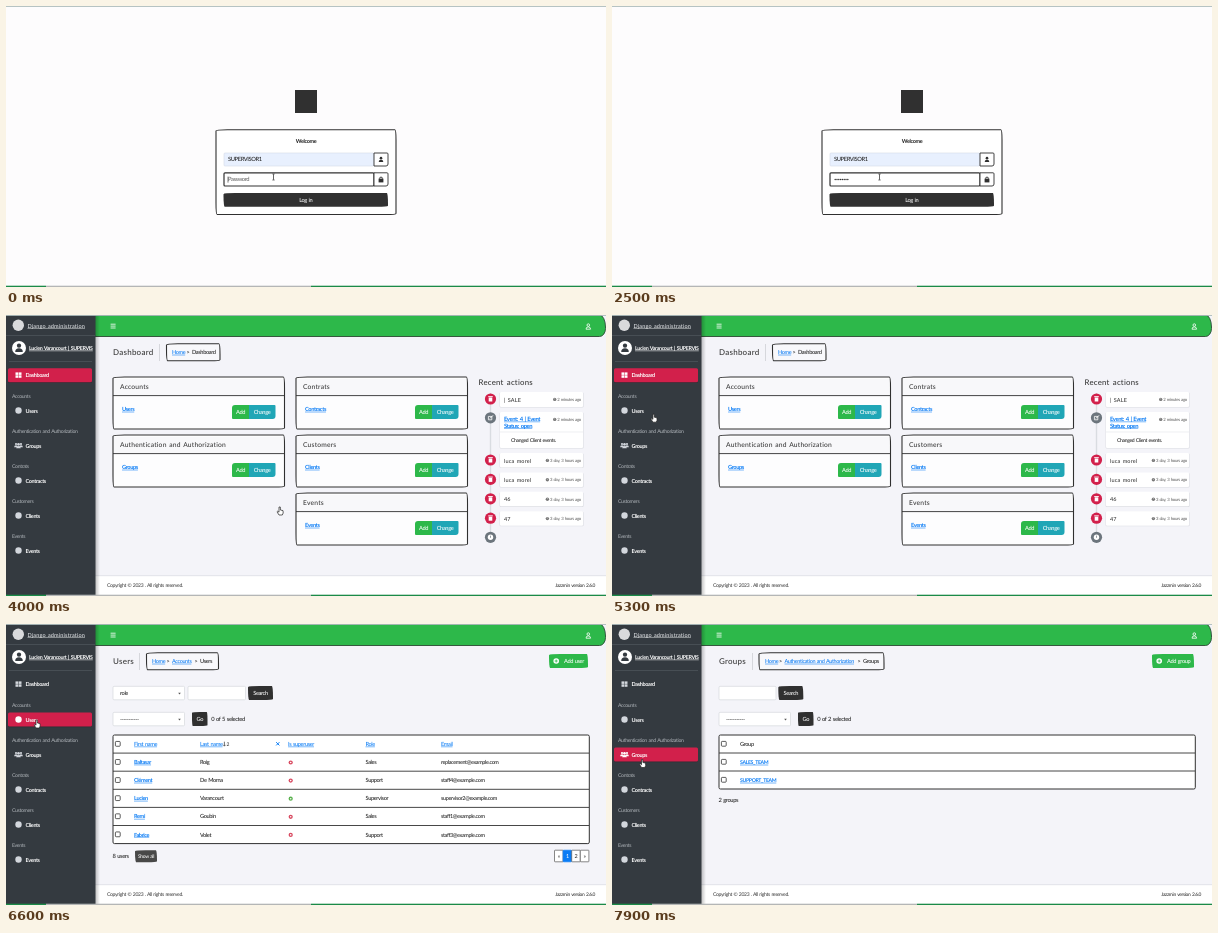
An HTML page with a canvas that plays this animation: 600x281 px, repeating every 8000 ms.

```html
<!DOCTYPE html>
<html lang="en">
<head>
<meta charset="utf-8">
<title>Admin walkthrough</title>
<style>
html, body { margin: 0; width: 100%; height: 100%; overflow: hidden; background: #fdfcfd; }
canvas { display: block; width: 600px; height: 281px; }
</style>
</head>
<body>
<canvas id="stage"></canvas>
<script>
const W = 600, H = 281, LOOP = 8000, STEP = 100;
const INK = '#303030', BLUE = '#0a7cf5', GREEN = '#2db84a', RED = '#d2204b', TEAL = '#20a6b6', PAGE = '#f4f4f9';
const canvas = document.getElementById('stage');
const ctx = canvas.getContext('2d');
const dpr = window.devicePixelRatio || 1;
canvas.width = W * dpr;
canvas.height = H * dpr;

// ---- helpers ----
function box(x, y, w, h, fill) {
  ctx.fillStyle = fill;
  ctx.fillRect(x, y, w, h);
}

function line(x1, y1, x2, y2, color, width = 1) {
  ctx.strokeStyle = color;
  ctx.lineWidth = width;
  ctx.beginPath();
  ctx.moveTo(x1, y1);
  ctx.lineTo(x2, y2);
  ctx.stroke();
}

function disc(x, y, r, fill) {
  ctx.fillStyle = fill;
  ctx.beginPath();
  ctx.arc(x, y, r, 0, 7);
  ctx.fill();
}

function round(x, y, w, h, r, fill, stroke, width = 0.7) {
  ctx.beginPath();
  ctx.roundRect(x, y, w, h, r);
  if (fill) { ctx.fillStyle = fill; ctx.fill(); }
  if (stroke) { ctx.strokeStyle = stroke; ctx.lineWidth = width; ctx.stroke(); }
}

// Hand-drawn looking box: uneven elliptical corners
function sketch(x, y, w, h, fill, stroke, width = 1) {
  const k = Math.min(0.045, h / 285, w / 500);
  const r = [{ x: 255 * k, y: 25 * k }, { x: 25 * k, y: 225 * k }, { x: 225 * k, y: 25 * k }, { x: 25 * k, y: 255 * k }];
  round(x, y, w, h, r, fill, stroke, width);
}

function text(s, x, y, size, color = '#222', o = {}) {
  const sp = o.sp ?? -0.07;
  ctx.font = `${o.bold ? 700 : 500} ${size}px Lato, "Open Sans", sans-serif`;
  ctx.textRendering = 'geometricPrecision';
  ctx.letterSpacing = sp * size + 'px';
  ctx.wordSpacing = 0.12 * size + 'px';
  ctx.fillStyle = color;
  ctx.textAlign = 'left';
  const w = ctx.measureText(s).width;
  if (o.align === 'center') x -= w / 2;
  if (o.align === 'right') x -= w;
  ctx.fillText(s, x, y);
  if (o.under) line(x, y + 0.8, x + w, y + 0.8, color, 0.55);
}

const head = (s, x, y, size, color = '#3a3a3a', o = {}) => text(s, x, y, size, color, { sp: 0.03, ...o });
const link = (s, x, y, size = 5.7, bold = false) => text(s, x, y, size, BLUE, { under: true, bold });

function button(s, x, y, w, h, fill) {
  sketch(x, y, w, h, fill);
  text(s, x + w / 2, y + h / 2 + 2, 5.7, '#fff', { align: 'center' });
}

function person(x, y, k, color) {
  disc(x, y - 1.3 * k, 1.2 * k, color);
  ctx.beginPath();
  ctx.arc(x, y + 2.2 * k, 2.1 * k, Math.PI, 0);
  ctx.fill();
}

function caretDown(x, y) {
  ctx.fillStyle = '#555';
  ctx.beginPath();
  ctx.moveTo(x - 1.3, y - 0.7);
  ctx.lineTo(x + 1.3, y - 0.7);
  ctx.lineTo(x, y + 1);
  ctx.fill();
}

// ---- login ----
function login(t) {
  box(0, 0, W, H, '#fdfcfd');
  box(289, 84, 22, 23, INK);
  sketch(210, 123.7, 180, 84.8, '#fff', INK, 1.1);
  text('Welcome', 300, 137, 5.5, '#222', { align: 'center', bold: true });

  round(218, 147, 150, 13, 1, '#e8f0fe', '#d5dbe6', 0.6);
  text('SUPERVISOR1', 222, 155.4, 5.8);
  round(368, 147, 14, 13, [0, 1, 2, 0], '#fff', INK, 0.9);
  person(375, 153.6, 1.1, INK);

  const focus = t < 3200;
  round(218, 166.8, 150, 13.2, 1, '#fff', '#333', focus ? 1.2 : 0.9);
  round(368, 166.8, 14, 13.2, [0, 1, 2, 0], '#fff', INK, 0.9);
  box(372.6, 172.6, 4.8, 3.8, INK);
  ctx.strokeStyle = INK;
  ctx.lineWidth = 0.9;
  ctx.beginPath();
  ctx.arc(375, 172.6, 1.5, Math.PI, 0);
  ctx.stroke();

  const keys = [800, 1000, 1200, 1400, 1900, 2100, 2300, 2500];
  const typed = keys.filter(k => t >= k).length;
  if (!typed) text('Password', 222, 175.4, 5.8, '#666');
  for (let i = 0; i < typed; i++) disc(223.2 + i * 1.8, 173.6, 0.75, '#333');
  const typing = t >= 800 && t < 2500;
  if (focus && (typing || t % 1000 < 500)) line(222 + typed * 1.85, 170.6, 222 + typed * 1.85, 176.6, '#222', 0.6);

  const hover = t >= 3100;
  button('Log in', 217.5, 187, 164.5, 13.8, hover ? '#1b1b1b' : '#313131');
}

// ---- admin frame ----
function menuItem(s, y, active) {
  if (active) {
    round(2, y - 6.3, 84, 14, 1.5, 'rgba(0,0,0,.22)');
    round(2, y - 7, 84, 14, 1.5, RED);
  }
  const c = active ? '#fff' : '#d3d7dd';
  if (s === 'Dashboard') {
    for (let i = 0; i < 4; i++) box(9.5 + (i % 2) * 3.2, y - 2.8 + (i >> 1) * 2.9, 2.8, 2.5, c);
  } else if (s === 'Groups') {
    person(10, y - 0.3, 0.9, c);
    person(15, y - 0.3, 0.9, c);
    person(12.5, y + 0.3, 1.1, c);
  } else {
    disc(12.5, y, 3.2, c);
  }
  text(s, 19.6, y + 2, 5.5, '#fff', { bold: true });
}

function sidebar(active) {
  const g = ctx.createLinearGradient(89, 0, 94, 0);
  g.addColorStop(0, 'rgba(0,0,0,.25)');
  g.addColorStop(1, 'rgba(0,0,0,0)');
  box(89, 0, 5, H, g);
  box(0, 0, 89.5, H, '#343a40');
  disc(12.3, 10.2, 5.7, '#d9dadc');
  head('Django administration', 21.5, 12.6, 5.5, '#dfe1e4', { under: true });
  line(0, 20.5, 89, 20.5, '#4c535a', 0.8);
  disc(13, 33, 7, '#fff');
  person(13, 33, 1.8, '#343a40');
  ctx.save();
  ctx.beginPath();
  ctx.rect(0, 24, 86.8, 20);
  ctx.clip();
  text('Lucien Varancourt | SUPERVISOR1', 23, 35, 5.4, '#fff', { under: true, bold: true });
  ctx.restore();
  line(3, 46.5, 86, 46.5, '#4c535a', 0.8);

  menuItem('Dashboard', 60.2, active === 'Dashboard');
  const groups = [['Accounts', 'Users'], ['Authentication and Authorization', 'Groups'],
    ['Contrats', 'Contracts'], ['Customers', 'Clients'], ['Events', 'Events']];
  groups.forEach(([title, item], i) => {
    text(title, 6, 83 + i * 35, 5.2, '#a6abb0');
    menuItem(item, 95.5 + i * 35, active === item);
  });
}

function crumbs(title, barX, x, w, parts) {
  head(title, 107, 40, 8);
  line(barX, 29, barX, 46, '#c9cbd0', 0.7);
  sketch(x, 28.8, w, 17, '#f8f8fb', INK, 1.1);
  parts.forEach(([s, px], i) => {
    const last = i === parts.length - 1;
    if (last) text(s, px, 39.2, 5.7);
    else link(s, px, 39.2, 5.5);
    if (!last) text('>', parts[i + 1][1] - 5.6, 39.2, 5.5);
  });
}

function frame(active, page) {
  box(0, 0, W, H, PAGE);
  round(86, 0, 513.5, 21.5, [0, { x: 6, y: 12 }, { x: 6, y: 8 }, 0], GREEN, '#2c4a34', 0.9);
  for (let i = 0; i < 3; i++) line(104.6, 9.2 + i * 1.9, 109.6, 9.2 + i * 1.9, '#fff', 0.8);
  ctx.strokeStyle = '#fff';
  ctx.lineWidth = 0.8;
  ctx.beginPath();
  ctx.arc(582.3, 10.1, 1.3, 0, 7);
  ctx.moveTo(580, 14.2);
  ctx.arc(582.3, 14.2, 2.3, Math.PI, 0);
  ctx.closePath();
  ctx.stroke();
  page();
  box(89, 261, 511, 20, '#fff');
  line(89, 260.7, W, 260.7, '#dcdfe4', 0.8);
  text('Copyright © 2023 . All rights reserved.', 101, 272.2, 5.1, '#444');
  text('Jazzmin version 2.6.0', 589, 272.2, 4.9, '#333', { align: 'right' });
  sidebar(active);
}

// ---- dashboard ----
function card(x, y, title, item) {
  sketch(x, y, 171.5, 52, '#fdfdfe', INK, 1.1);
  box(x + 1, y + 2, 169, 16, '#f8f8fa');
  line(x, y + 18.6, x + 171, y + 18.6, INK, 0.9);
  head(title, x + 7, y + 11.6, 6.7);
  link(item, x + 9, y + 34.2, 5.7, true);
  round(x + 119, y + 28, 17, 14, [3, 0, 0, 1], GREEN);
  round(x + 136, y + 28, 26.5, 14, [0, 1, 3, 0], TEAL);
  text('Add', x + 127.5, y + 37.1, 5.7, '#fff', { align: 'center' });
  text('Change', x + 149, y + 37.1, 5.7, '#fff', { align: 'center' });
}

function action(y, h, title, ago, kind) {
  round(493.6, y + 0.6, 84, h, 1, '#dcdde2');
  round(494, y, 83, h, 1, '#fff');
  const cy = kind === 'edit' ? y + 5.8 : y + 7;
  disc(484.5, cy, 5.6, kind === 'edit' ? '#6c757d' : RED);
  if (kind === 'edit') {
    ctx.strokeStyle = '#fff';
    ctx.lineWidth = 0.8;
    ctx.strokeRect(482.4, cy - 1.4, 3.4, 3.4);
    line(484, cy + 0.6, 487, cy - 2.4, '#fff', 1);
    link('Event: 4 | Event', 498, y + 9, 5.9, true);
    link('Status: open', 498, y + 15.6, 5.9, true);
    line(494, y + 20, 577, y + 20, '#e3e5e9', 0.6);
    text('Changed Client events.', 505, y + 30.4, 5.1);
  } else {
    box(482.7, cy - 1.5, 3.6, 4, '#fff');
    box(482.2, cy - 2.8, 4.6, 0.9, '#fff');
    head(title, 498, y + 9.6, 5.5);
  }
  text(ago, 575, y + 9, 4.3, '#666', { align: 'right' });
  const x = 575 - ctx.measureText(ago).width - 2.6;
  disc(x, y + 7.4, 1.7, '#777');
  line(x, y + 7.4, x, y + 6.4, '#fff', 0.5);
}

function dashboard() {
  crumbs('Dashboard', 153.5, 160.5, 53.5, [['Home', 166], ['Dashboard', 186]]);
  card(107, 62, 'Accounts', 'Users');
  card(107, 120, 'Authentication and Authorization', 'Groups');
  card(290, 62, 'Contrats', 'Contracts');
  card(290, 120, 'Customers', 'Clients');
  card(290, 178, 'Events', 'Events');
  head('Recent actions', 472.5, 70, 7.8);
  box(483.8, 78, 1.4, 146, '#d9dce1');
  action(77, 15, '| SALE', '2 minutes ago');
  action(97, 36, '', '2 minutes ago', 'edit');
  ['luca morel', 'luca morel', '46', '47'].forEach((s, i) => action(138 + i * 19.4, 14.5, s, '3 day, 3 hours ago'));
  disc(484.5, 222.3, 5.6, '#6c757d');
  disc(484.5, 222.3, 2.7, '#fff');
  line(484.5, 220.6, 484.5, 222.8, '#6c757d', 0.7);
}

// ---- list pages ----
function addButton(s, x) {
  sketch(x, 30, 582 - x, 14, GREEN);
  disc(x + 7.2, 37, 2.8, '#fff');
  line(x + 5.7, 37, x + 8.7, 37, GREEN, 0.8);
  line(x + 7.2, 35.5, x + 7.2, 38.5, GREEN, 0.8);
  text(s, x + 15, 39, 5.7, '#fff');
}

const field = (x, y, w, h) => round(x, y, w, h, 1, '#fff', '#d6d8dd', 0.7);

function actionBar(rough, count) {
  if (rough) {
    round(107, 90.7, 54, 9, 0.5, '#fff', '#777', 0.7);
    text('-----------', 109, 97, 5.6);
    line(156, 94.6, 157.5, 96, '#222', 0.7);
    line(157.5, 96, 159, 94.6, '#222', 0.7);
  } else {
    field(107, 88.3, 71.5, 13.5);
    text('-----------', 114, 97, 5.6);
    caretDown(173.5, 95.4);
  }
  const x = rough ? 169 : 186;
  button('Go', x, 88, 15.5, 14, INK);
  text(`0 of ${count} selected`, x + 19.3, 97, 5.8);
}

function check(y) {
  round(109.4, y - 2.4, 4.8, 4.8, 0.8, '#fff', '#333', 0.8);
}

function grid(y, rows, h) {
  const bottom = y + h * (rows + 1);
  round(107, y, 476.3, bottom - y, 1.5, '#fff', INK, 1);
  for (let i = 0; i <= rows; i++) {
    if (i) line(107, y + i * h, 583, y + i * h, '#333', 0.9);
    check(y + i * h + h / 2 - 0.2);
  }
}

const people = [
  ['Baltasar', 'Roig', 'Sales', 'replacement@example.com'],
  ['Clément', 'De Morna', 'Support', 'staff4@example.com'],
  ['Lucien', 'Varancourt', 'Supervisor', 'supervisor2@example.com'],
  ['Remi', 'Goubin', 'Sales', 'staff1@example.com'],
  ['Fabrice', 'Volet', 'Support', 'staff3@example.com']
];

function users(rough) {
  crumbs('Users', 133.5, 140.5, 72, [['Home', 146], ['Accounts', 166], ['Users', 194]]);
  addButton('Add user', 543);
  if (rough) {
    sketch(107, 62.3, 44, 13.6, '#fff', INK, 1.1);
    line(146.5, 68.6, 148, 70, '#222', 0.8);
    line(148, 70, 149.5, 68.6, '#222', 0.8);
  } else {
    field(107, 62.3, 71.5, 13.5);
    caretDown(173.5, 69.4);
  }
  text('role', 114, 71.2, 5.7);
  field(rough ? 154 : 182, 62.3, 57.5, 13.5);
  button('Search', rough ? 214 : 242, 62, 25, 14, INK);
  actionBar(rough, 5);

  const top = rough ? 108.8 : 111, h = 18.1;
  grid(top, 5, h);
  const hy = top + 11;
  link('First name', 128, hy);
  link('Last name', 194, hy);
  line(218.4, hy - 4.3, 218.4, hy, '#333', 0.7);
  line(217.2, hy - 1.2, 218.4, hy + 0.2, '#333', 0.6);
  line(219.6, hy - 1.2, 218.4, hy + 0.2, '#333', 0.6);
  text('2', 220.4, hy, 5, '#333');
  line(270.2, hy - 3.8, 273.4, hy - 0.6, BLUE, 1);
  line(273.4, hy - 3.8, 270.2, hy - 0.6, BLUE, 1);
  link('Is superuser', 282, hy);
  link('Role', 359.5, hy);
  link('Email', 435, hy);
  people.forEach(([first, last, role, mail], i) => {
    const y = hy + h * (i + 1);
    link(first, 128, y, 5.6, true);
    text(last, 194, y, 5.7);
    disc(284.7, y - 1.6, 2.1, i === 2 ? '#58b04c' : '#d8485f');
    disc(284.7, y - 1.6, 0.8, '#fff');
    text(role, 359.5, y, 5.7);
    text(mail, 435, y, 5.5);
  });

  const foot = top + 115.2;
  text('8 users', 106.5, foot + 7.4, 5.8);
  sketch(129, foot, 22, 12, '#484848');
  text('Show all', 140, foot + 7.8, 5, '#fff', { align: 'center' });
  ['«', '1', '2', '»'].forEach((s, i) => {
    const on = s === '1';
    round(548.5 + i * 8.6, foot, 8.6, 11.6, 0.6, on ? BLUE : '#fff', on ? BLUE : '#555', 0.7);
    text(s, 552.8 + i * 8.6, foot + 7.7, 5.5, on ? '#fff' : '#333', { align: 'center' });
  });
}

function groups(rough) {
  crumbs('Groups', 140.5, 147, 125, [['Home', 153], ['Authentication and Authorization', 172.5], ['Groups', 251]]);
  addButton('Add group', 540);
  field(107, 62.3, 57, 13.5);
  button('Search', 166.3, 62, 25, 14, INK);
  actionBar(rough, 2);
  const top = rough ? 108.8 : 111;
  grid(top, 2, 18);
  text('Group', 128, top + 11.2, 5.7);
  link('SALES_TEAM', 128, top + 29.2, 5.2, true);
  link('SUPPORT_TEAM', 128, top + 47.2, 5.2, true);
  text('2 groups', 106.5, top + 67, 5.8);
}

// ---- overlays ----
function status(s) {
  box(0, 272, 74, 9, '#2b2f34');
  text(s, 2, 278.2, 4.8, '#e6e8ea');
}

function shape(points, x, y) {
  ctx.beginPath();
  points.forEach(([px, py]) => ctx.lineTo(x + px, y + py));
  ctx.closePath();
  ctx.fillStyle = '#fff';
  ctx.strokeStyle = '#222';
  ctx.lineWidth = 0.7;
  ctx.lineJoin = 'round';
  ctx.fill();
  ctx.stroke();
}

const HAND = [[-1, -4], [0.3, -4], [0.4, -1], [3, -0.4], [3.2, 2], [2.3, 4], [-1, 4], [-3, 0.8], [-2.3, 0.2], [-1, 1.2]];
const ARROW = [[-1.4, -3.5], [-1.4, 3], [0, 1.8], [1, 4], [2, 3.5], [1.1, 1.4], [2.9, 1.3]];
const path = [[0, 267.5, 171], [2700, 267.5, 171], [3200, 274, 196], [4600, 274, 196],
  [5400, 31.5, 99], [6700, 31, 100], [7100, 30.5, 139.5], [8000, 30.5, 139.5]];

function cursor(t) {
  const i = path.findIndex((p, n) => n && t < p[0]);
  const [t0, x0, y0] = path[i - 1], [t1, x1, y1] = path[i];
  const u = (t - t0) / (t1 - t0), e = u * u * (3 - 2 * u);
  const x = x0 + (x1 - x0) * e, y = y0 + (y1 - y0) * e;
  if (t < 3800 && y < 180) {
    line(x, y - 2.8, x, y + 2.8, '#222', 0.7);
    line(x - 1.2, y - 3, x + 1.2, y - 3, '#222', 0.6);
    line(x - 1.2, y + 3, x + 1.2, y + 3, '#222', 0.6);
    return;
  }
  const loading = t >= 5800 && t < 6100;
  const overLink = t < 4700 ? y > 186 : x < 86;
  shape(overLink && !loading ? HAND : ARROW, x, y);
}

function draw(t) {
  ctx.setTransform(dpr, 0, 0, dpr, 0, 0);
  if (t < 3800) {
    login(t);
  } else if (t < 5800) {
    frame('Dashboard', dashboard);
  } else if (t < 7400) {
    const rough = t < 6100;
    frame(rough ? '' : 'Users', () => users(rough));
  } else {
    const rough = t < 7600;
    frame(rough ? '' : 'Groups', () => groups(rough));
  }
  if (t >= 5500 && t < 6200) status('127.0.0.1:8000/admin/accounts/user/');
  if (t >= 7100 && t < 7600) status('127.0.0.1:8000/admin/auth/group/');
  box(0, 0, W, 0.9, '#aebdbd');
  box(0, 279.7, 40, 1.3, '#1b8a48');
  box(40, 279.7, 265, 1.3, '#b4b6b6');
  box(305, 279.7, 295, 1.3, '#1b8a48');
  cursor(t);
}

const start = performance.now();
function tick() {
  const t = (performance.now() - start) % LOOP;
  draw(Math.floor(t / STEP) * STEP);
  requestAnimationFrame(tick);
}
tick();
</script>
</body>
</html>
```
